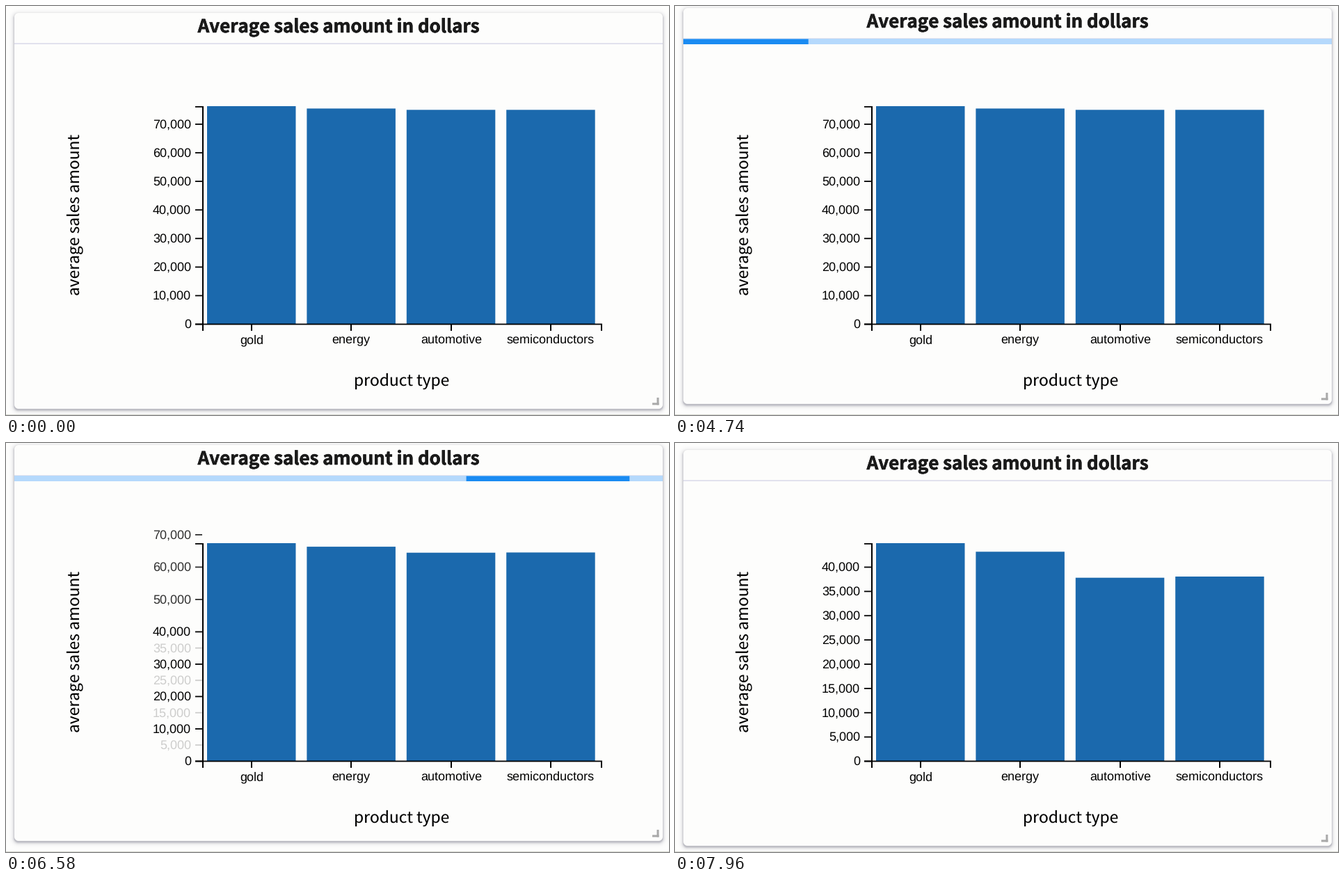
Animation of 953 by 588 pixels, one loop 8000 ms. Source, as a matplotlib script:

```python
import numpy as np
import matplotlib.pyplot as plt
from matplotlib.animation import FuncAnimation
from matplotlib.patches import Rectangle
from matplotlib.patheffects import withStroke

W, H, DPI = 953, 588, 64
STEP, LOOP = 20, 8000

LEFT, RIGHT = 12, 944            # card edges
BASE, TOP, AXIS_X = 457, 144, 283
BAR_BLUE, TRACK, FILL = "#1b69ad", "#b5d9fc", "#1a8bf2"

LOAD_ON, LOAD_OFF = 4620, 7700   # loading state, ms
LIFT = 7                         # card shift while loading
MORPH_START, MORPH_LEN = 6080, 1382

SCALE = (0.004108, 0.006975)     # px per unit before and after
TICKS = (range(0, 70001, 10000), range(0, 40001, 5000))
BARS = [("gold", 144, 144), ("energy", 147.4, 156.3),
        ("automotive", 149.3, 193.7), ("semiconductors", 149.3, 192)]

plt.rcParams["text.hinting"] = "none"
fig = plt.figure(figsize=(W / DPI, H / DPI), dpi=DPI, facecolor="#fefefd")
ax = fig.add_axes([0, 0, 1, 1])
ax.set_xlim(0, W)
ax.set_ylim(H, 0)
ax.axis("off")


def pt(px):
    return px * 72 / DPI


def box(x0, y0, x1, y1, color, z=1):
    return ax.add_patch(Rectangle((x0, y0), x1 - x0, y1 - y0, fc=color,
                                  lw=0, zorder=z, snap=False))


def text(x, y, s, size, family="Liberation Sans", ha="center", **kw):
    return ax.text(x, y, s, fontsize=pt(size), family=family, ha=ha,
                   va="baseline", zorder=4, **{"color": "black", **kw})


def bezier(x1, y1, x2, y2):
    """CSS cubic-bezier as a function of progress."""
    s = np.linspace(0, 1, 400)
    a, b, c = 3 * (1 - s) ** 2 * s, 3 * (1 - s) * s ** 2, s ** 3
    xs, ys = a * x1 + b * x2 + c, a * y1 + b * y2 + c
    return lambda p: float(np.interp(p, xs, ys))


def ease_in_out(p):
    p = min(max(p, 0), 1)
    return 4 * p ** 3 if p < 0.5 else 1 - 4 * (1 - p) ** 3


def card_image(dy):
    """Page with the rounded card and its soft shadow."""
    yy, xx = np.mgrid[0:H, 0:W] + 0.5

    def dist(y0, y1, r=6):
        qx = np.abs(xx - (LEFT + RIGHT) / 2) - (RIGHT - LEFT) / 2 + r
        qy = np.abs(yy - (y0 + y1) / 2) - (y1 - y0) / 2 + r
        outside = np.hypot(np.maximum(qx, 0), np.maximum(qy, 0))
        return outside + np.minimum(np.maximum(qx, qy), 0) - r

    page = np.ones((H, W, 3)) * (254, 254, 253)
    page[H - 1] = (218, 219, 212)
    shade = 0.36 * np.exp(-np.maximum(dist(12 + dy, 581 + dy), 0) / 2.1)[..., None]
    page = page * (1 - shade) + np.array((80, 80, 100)) * shade
    card = np.clip(0.5 - dist(10 + dy, 579 + dy), 0, 1)[..., None]
    page = page * (1 - card) + np.array((253, 253, 252)) * card
    return fig.figimage(page.round().astype(np.uint8), origin="upper", zorder=-1)


cards = [card_image(0), card_image(-LIFT)]

# header, resize handle and axis titles
TITLE_Y = 38
title = text(478, TITLE_Y, "Average sales amount in dollars", 25.9,
             "Noto Sans CJK JP", weight="bold", color="#1a1a1a")
title.set_path_effects([withStroke(linewidth=pt(0.6), foreground="#1a1a1a")])
rule = box(LEFT, 53.4, RIGHT, 54.8, "#d6d6e8")
handle = [box(929, 570.5, 938.5, 573.5, "#a9a9a9"),
          box(935.5, 563, 938.5, 573.5, "#a9a9a9")]
text(105, 300, "average sales amount", 22.8, "Noto Sans CJK JP",
     rotation=90, rotation_mode="anchor")
text(568.5, 546, "product type", 22.8, "Noto Sans CJK JP")

# loading strip
track = box(LEFT, 47, RIGHT, 55, TRACK, 2)
runners = [box(LEFT, 47.5, LEFT, 55, FILL, 3) for _ in range(2)]

# bars and axes
bars = []
for i, (name, y0, y1) in enumerate(BARS):
    x = 289 + 143.4 * i
    bars.append(box(x, y0, x + 127.5, BASE, BAR_BLUE))
    mid = round(x + 64)
    box(mid - 1, BASE, mid + 1, 467, "black", 3)
    text(mid, 485, name, 18)
box(AXIS_X - 1, TOP, AXIS_X + 1, 467, "black", 3)
box(AXIS_X - 11, TOP, AXIS_X, TOP + 1.8, "black", 3)
box(AXIS_X - 11, BASE - 0.4, 857, BASE + 1.4, "black", 3)
box(855, BASE, 857, 467, "black", 3)

clip = ax.add_patch(Rectangle((0, 62), W, H, fill=False, lw=0))
ticks = []
for value in sorted(set(TICKS[0]) | set(TICKS[1])):
    label = text(266, BASE + 6, f"{value:,}", 18, ha="right")
    mark = box(AXIS_X - 11, BASE, AXIS_X - 1, BASE + 1.8, "black", 2)
    for part in (label, mark):
        part.set_clip_path(clip)
    ticks.append((value, label, mark))

ease_long = bezier(0.65, 0.815, 0.735, 0.395)
ease_short = bezier(0.165, 0.84, 0.44, 1)
PACE = ([LOAD_ON, 4740, 6280, 6880, 7300, LOAD_OFF],
        [0, 0.105, 1.53, 1.866, 2.1, 2.32])
CYCLE, DELAY = 2.1, 1.15


def place_runner(bar, left, right):
    """left and right are insets as fractions of the strip."""
    a, b = np.clip([left, 1 - right], 0, 1)
    bar.set_x(LEFT + a * (RIGHT - LEFT))
    bar.set_width(max(b - a, 0) * (RIGHT - LEFT))


def draw_loading(ms):
    on = LOAD_ON <= ms < LOAD_OFF
    dy = -LIFT if on else 0
    cards[0].set_visible(not on)
    cards[1].set_visible(on)
    title.set_y(TITLE_Y + dy)
    rule.set_y(53.4 + dy)
    handle[0].set_y(570.5 + dy)
    handle[1].set_y(563 + dy)
    for part in (track, *runners):
        part.set_visible(on)
    if not on:
        return
    t = float(np.interp(ms, *PACE))
    p = ease_long(min(t % CYCLE / (0.6 * CYCLE), 1))
    place_runner(runners[0], -0.35 + 1.35 * p, 1 - 1.9 * p)
    p = 0
    if t >= DELAY:
        p = ease_short(min((t - DELAY) % CYCLE / (0.6 * CYCLE), 1))
    place_runner(runners[1], -2 + 3.07 * p, 1 - 1.08 * p)


def draw_chart(ms):
    k = ease_in_out((ms - MORPH_START) / MORPH_LEN)
    for bar, (_, y0, y1) in zip(bars, BARS):
        y = y0 + (y1 - y0) * k
        bar.set_y(y)
        bar.set_height(BASE - y)
    scale = SCALE[0] + (SCALE[1] - SCALE[0]) * k
    for value, label, mark in ticks:
        alpha = (value in TICKS[0]) * (1 - k) + (value in TICKS[1]) * k
        y = BASE - value * scale
        label.set_y(y + 6)
        mark.set_y(y - 0.4)
        for part in (label, mark):
            part.set_alpha(alpha)
            part.set_visible(alpha > 0.004)


def update(i):
    ms = i * STEP
    draw_loading(ms)
    draw_chart(ms)
    return []


anim = FuncAnimation(fig, update, frames=LOOP // STEP, interval=STEP,
                     repeat=True, repeat_delay=0, blit=False)
plt.show()
```
